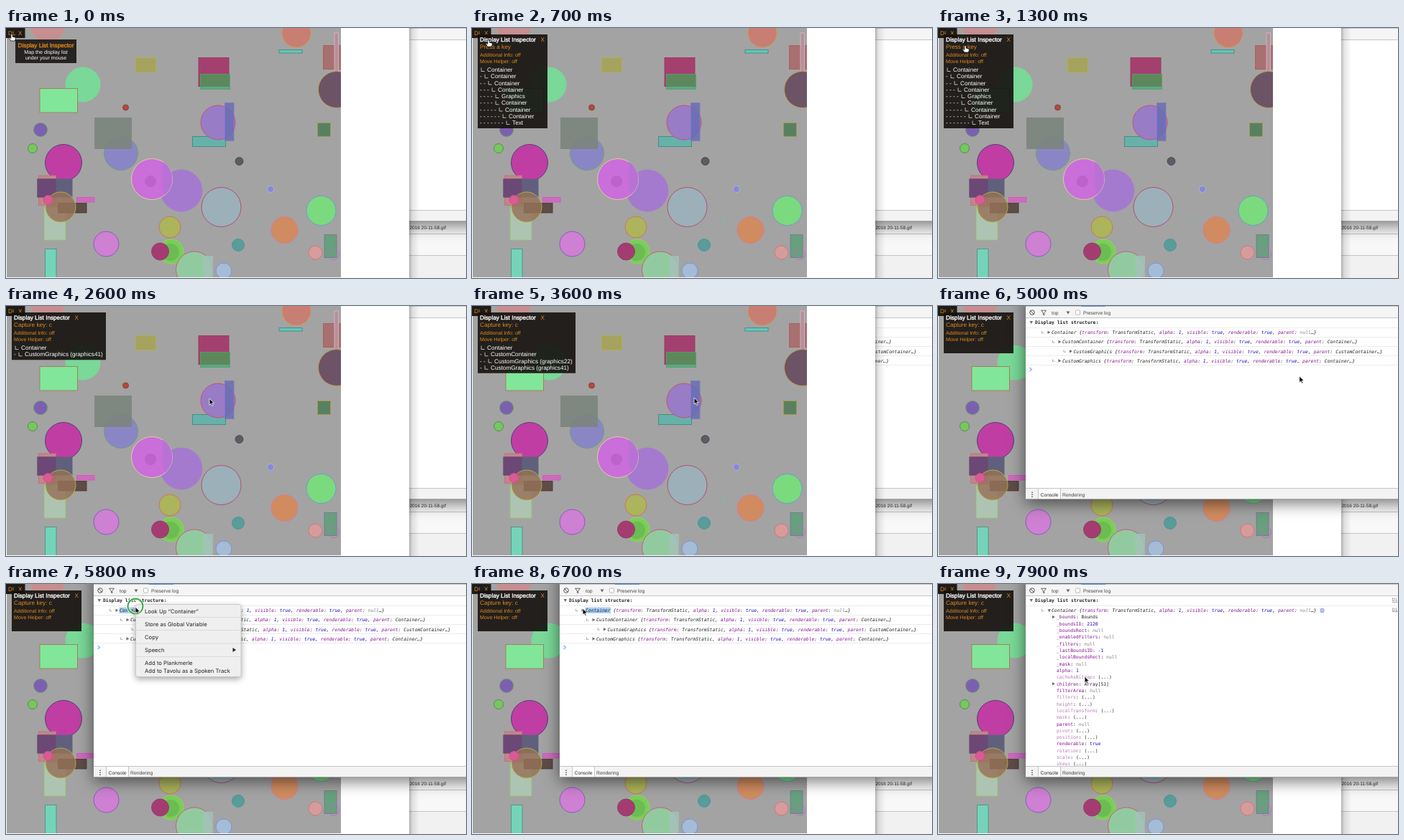
Write an HTML page that moves like this. It is 640 by 349 pixels and loops after 8 s.

```html
<!DOCTYPE html>
<html lang="en">
<head>
<meta charset="utf-8">
<title>Display List Inspector</title>
<style>
  html, body { margin: 0; width: 100%; height: 100%; overflow: hidden; background: #fff; }
  svg { display: block; width: 100%; height: 100%; }
  text { white-space: pre; text-rendering: geometricPrecision; }
  .ui { font: 8.2px "Liberation Sans", Arial, sans-serif; fill: #fff; }
  .ui .hot { fill: #e08a1c; }
  .ui .small { font-size: 7.1px; }
  .title { stroke: currentColor; stroke-width: .35; }
  .bar { font: 6.8px "Liberation Sans", Arial, sans-serif; fill: #444; }
  .menu { font: 7.7px Inter, sans-serif; fill: #222; }
  .log { font: 6.38px "DejaVu Sans Mono", monospace; fill: #222; }
  .key { fill: #881391; }
  .dim { fill: #b87cbd; }
  .val { fill: #1c00cf; }
  .nil { fill: #808080; }
  .line { stroke: #ececec; }
  .edge { stroke: #c4c4c4; }
</style>
</head>
<body>
<svg viewBox="0 0 640 349">
  <defs>
    <linearGradient id="fade">
      <stop stop-color="#000" stop-opacity=".28"/>
      <stop offset=".3" stop-color="#000" stop-opacity=".1"/>
      <stop offset="1" stop-color="#000" stop-opacity="0"/>
    </linearGradient>
    <clipPath id="page"><rect x="1" width="465" height="348"/></clipPath>
    <clipPath id="behind"><rect x="561" width="79" height="349"/></clipPath>
  </defs>

  <g id="browser">
    <rect width="561" height="349" fill="#fff"/>
    <rect x="1" width="465" height="348" fill="#a3a3a3"/>
    <g clip-path="url(#page)" stroke-opacity=".85">
      <circle cx="58" cy="-6" r="25" fill="#c68e90" stroke="#b9a37c"/>
      <circle cx="404" cy="7" r="20" fill="#c87e72" stroke="#d49a48"/>
      <rect x="380" y="30.500" width="32" height="4.500" fill="#66c6ba" stroke="#3c8a80"/>
      <rect x="441.500" y="24.500" width="26" height="33" fill="#a87070" stroke="#ae5a54"/>
      <rect x="457" y="7" width="5.500" height="55" fill="#b39298" stroke="#e4b2ca"/>
      <circle cx="460" cy="86" r="25.500" fill="#6c5366" stroke="#bca048"/>
      <rect x="433.500" y="132.500" width="18" height="19" fill="#588060" stroke="#aa9a40"/>
      <rect x="180.500" y="41.500" width="28" height="20" fill="#a6a260" stroke="#b0b444"/>
      <rect x="268" y="41.500" width="42" height="40" fill="#a44070" stroke="#9a3454"/>
      <rect x="270.500" y="64.500" width="41" height="21" fill="#5c885c" stroke="#52a468"/>
      <path d="M271 83.500h40" stroke="#5cae90" stroke-width="3"/>
      <circle cx="107" cy="79" r="24" fill="#7ad898" stroke="#70e490"/>
      <rect x="47" y="84.500" width="52.500" height="33.500" fill="#82e69a" stroke="#a07a50"/>
      <circle cx="166.500" cy="111" r="4" fill="#b44a3a" stroke="#80403a"/>
      <circle cx="48" cy="142" r="9.500" fill="#7c60b0" stroke="#649a68"/>
      <circle cx="37" cy="168" r="6.500" fill="#78c660" stroke="#468a42"/>
      <circle cx="160" cy="175" r="23.500" fill="#8a86c6" stroke="#68a06c"/>
      <rect x="123" y="125" width="52" height="44" fill="#7c847e" fill-opacity=".9"/>
      <rect x="259.500" y="151.500" width="46" height="14" fill="#66b2aa" stroke="#40867e"/>
      <circle cx="295" cy="132" r="24" fill="#997cc6" stroke="#ce4470"/>
      <rect x="304.500" y="104.500" width="12.500" height="53" fill="#666cb4" fill-opacity=".8" stroke="#8078c6"/>
      <circle cx="80" cy="188" r="25.500" fill="#c03ea4" stroke="#443868"/>
      <circle cx="244" cy="227" r="29" fill="#a47ace" stroke="#a67ad6"/>
      <circle cx="203" cy="211" r="28.500" fill="#ca6eda" stroke="#e6d8a0"/>
      <circle cx="201" cy="214" r="8" fill="#bc62ca"/>
      <path d="M218 186.500A28.500 28.500 0 0 1 222 232A29 29 0 0 1 218 213Z" fill="#b872d6"/>
      <circle cx="299.500" cy="250" r="27.500" fill="#9cb0ba" stroke="#b4405e"/>
      <circle cx="324.500" cy="186" r="5.500" fill="#605a64" stroke="#484448"/>
      <circle cx="368" cy="225" r="4.500" fill="#8888d6" stroke="#b8b2ea"/>
      <circle cx="438.500" cy="255" r="20.500" fill="#7cda7e" stroke="#609cd0"/>
      <circle cx="387.500" cy="282" r="18.500" fill="#d08c60" stroke="#e07494"/>
      <circle cx="323" cy="303" r="8.500" fill="#5a9c98" stroke="#3c94a2"/>
      <circle cx="350" cy="271" r="1.500" fill="#6cc4b4"/>
      <circle cx="430.500" cy="313.500" r="9.500" fill="#d69c9c" stroke="#d2706e"/>
      <rect x="443" y="288.500" width="17" height="32" fill="#66a07c" stroke="#7a7498"/>
      <circle cx="456" cy="316" r="7.500" fill="none" stroke="#c066ce"/>
      <circle cx="228" cy="278" r="15" fill="#acb45c" stroke="#ca7050"/>
      <circle cx="230" cy="312" r="17" fill="#7ace58" stroke="#96d85c"/>
      <circle cx="229" cy="313" r="12" fill="#6cbc54"/>
      <circle cx="214.500" cy="312" r="12" fill="#a43c72" stroke="#8a3c62"/>
      <circle cx="262" cy="337.500" r="25.500" fill="#92caa0" stroke="#c85070"/>
      <rect x="275" y="318" width="13" height="31" fill="#a4c2ba" fill-opacity=".85"/>
      <circle cx="303" cy="339" r="11" fill="#a4bcd6" stroke="#748cda"/>
      <circle cx="139.500" cy="301.500" r="17.500" fill="#ce80d2" stroke="#8450be"/>
      <rect x="54.500" y="308.500" width="15.500" height="42" fill="#74d4ba" stroke="#4c9078"/>
      <rect x="53" y="250" width="30" height="46" fill="#aec4b2" stroke="#94c268"/>
      <rect x="45.500" y="206" width="24" height="41.500" fill="#c0868c" stroke="#cc6a74"/>
      <rect x="43.500" y="210.500" width="49" height="26" fill="#60607c"/>
      <rect x="43.500" y="210.500" width="26" height="26" fill="#6c4876"/>
      <rect x="98.500" y="236.500" width="24.500" height="6.500" fill="#cc6cba" stroke="#d650ca"/>
      <rect x="72.500" y="244.500" width="39.500" height="13.500" fill="#5e4c46" stroke="#4c3632"/>
      <circle cx="76" cy="250" r="21" fill="#967258" fill-opacity=".82" stroke="#b2ba48"/>
      <circle cx="58.500" cy="240" r="6.500" fill="#d65c92" stroke="#e04494"/>
    </g>
    <g class="ui">
      <rect width="26.500" height="14" fill="#1e1b18"/>
      <text class="hot" x="3" y="10">DL</text>
      <text class="hot" x="17" y="10">X</text>
    </g>
    <g id="panels" class="ui"></g>
    <g class="ui" data-on="0 400" text-anchor="middle">
      <rect x="13" y="16" width="85" height="33" fill="#262322"/>
      <text class="hot title" color="#e08a1c" x="55.500" y="26.700">Display List Inspector</text>
      <text class="small" x="55.500" y="35.700">Map the display list</text>
      <text class="small" x="55.500" y="43.700">under your mouse</text>
    </g>
  </g>

  <g id="files">
    <rect x="561" width="79" height="349" fill="#f8f8f8"/>
    <path class="edge" d="M561 287.500h79M561 317.500h79"/>
    <rect x="561" y="318" width="79" height="31" fill="#f1f1f1"/>
  </g>

  <g id="console">
    <rect x="122" y="-20" width="540" height="290" style="filter:drop-shadow(0 5px 11px rgba(0,0,0,.55))"/>
    <rect x="122" width="518" height="270" fill="#fff"/>
    <rect x="122" width="518" height="16" fill="#f5f5f5"/>
    <path class="edge" d="M122 .5h518M122 16.500h518"/>
    <path d="M199 .5h34" stroke="#5b8ee6"/>
    <g fill="none" stroke="#555">
      <circle cx="131" cy="9" r="3.300"/>
      <path d="M128.700 6.700l4.600 4.600"/>
      <path d="M143.500 6.200h7l-2.700 3.300v3.500l-1.500-1v-2.500z" stroke-width=".9"/>
      <rect x="191.500" y="6" width="6" height="6" rx="1" fill="#fff" stroke="#aaa" stroke-width=".8"/>
    </g>
    <g class="bar">
      <text x="158" y="11.500">top</text>
      <path d="M178.500 7.500h5l-2.500 4z" fill="#666"/>
      <text x="202" y="11.500">Preserve log</text>
    </g>
    <g id="log" class="log"></g>
    <g class="bar">
      <rect x="122" y="254" width="518" height="16" fill="#f3f3f3"/>
      <rect x="140" y="254" width="30" height="16" fill="#fff"/>
      <path class="edge" d="M122 254.500h518M139.500 254v16M170.500 254v16"/>
      <path d="M122 269.500h518" stroke="#a8a8a8"/>
      <path d="M131 259.500v8" stroke="#555" stroke-width="1.500" stroke-dasharray="1.500 1.500"/>
      <text x="142.500" y="266" fill="#222">Console</text>
      <text x="173" y="266">Rendering</text>
    </g>
  </g>
  <text class="bar" x="561.500" y="281.300" style="font-size:6.5px;fill:#222">2016 20-11-58.gif</text>
  <rect id="shade" x="561" width="14" height="349" fill="url(#fade)"/>

  <g id="menu" class="menu" data-on="5700 6300">
    <rect x="180.500" y="28.500" width="146.500" height="101" rx="3" fill="#efefef" stroke="#bdbdbd" stroke-width=".7" style="filter:drop-shadow(0 3px 4px rgba(0,0,0,.35))"/>
    <path d="M181 46.500h146M181 64.500h146M181 83h146M181 101.500h146" stroke="#dadada"/>
    <path d="M315.500 89l4.500 3-4.500 3z"/>
  </g>

  <circle data-on="4500 4700" cx="582.600" cy="114.500" r="12.300" fill="none" stroke="#111" stroke-width="2"/>
  <g data-on="5700 5900" fill="none">
    <circle cx="180" cy="31" r="10.500" stroke="#fff" stroke-opacity=".7" stroke-width="4"/>
    <circle cx="180" cy="31" r="10.500" stroke="#3cae48" stroke-width="2"/>
  </g>
  <g id="cursor" stroke-width=".8" stroke-linejoin="round">
    <path data-on="0 1600" d="M-1.200 0Q0-1.200 1.200 0V3.200L4.800 4Q5.600 4.600 5.200 6.500L4.300 9H-1.200L-3.800 5.200Q-3.600 4-2.300 4.600L-1.200 5.500Z" fill="#fff" stroke="#111"/>
    <path data-on="1600 8000" d="M0 0V9.200L2.100 7.300 3.600 10.500 5.100 9.800 3.700 6.700H6.500Z" fill="#111" stroke="#fff"/>
  </g>
</svg>

<script>
const $ = id => document.getElementById(id);
const text = (x, y, body, attrs = '') => `<text x="${x}" y="${y}" ${attrs}>${body}</text>`;
const span = (cls, body) => `<tspan class="${cls}">${body}</tspan>`;

// Inspector overlay: rows are [depth, label]
function panel(on, key, rows = [], right = 105) {
  const height = 57 + 9.25 * Math.max(0, rows.length - 1);
  const tree = rows.map(([depth, label], i) => {
    const x = 11 + depth * 5.01, y = 61 + i * 9.25;
    return text(11, y, '- '.repeat(depth)) + text(x + 10, y, label) +
      `<path d="M${x + 2} ${y - 5.5}v5h4.500" fill="none" stroke="#ddd" stroke-width=".8"/>`;
  }).join('');
  return `<g data-on="${on}"><rect x="8" y="9" width="${right - 8}" height="${height}" fill="#14110f" fill-opacity=".9"/>` +
    text(11, 19, 'Display List Inspector', 'class="title" color="#fff"') +
    text(95.5, 19, 'X', 'class="hot"') + text(11, 28.7, key, 'class="hot"') +
    text(11, 40, 'Additional Info: off', 'class="hot small"') +
    text(11, 48.8, 'Move Helper: off', 'class="hot small"') + tree + '</g>';
}

const capture = 'Capture key: c', box = 'Container';
const uiRows = [0, 1, 2, 3, 4, 4, 5, 6, 7].map((d, i) => [d, i === 4 ? 'Graphics' : i === 8 ? 'Text' : box]);
$('panels').innerHTML =
  panel('400 1500', 'Press a key', uiRows) +
  panel('1500 1700', capture, uiRows) +
  panel('1700 2300 3700 8000', capture) +
  panel('2300 2900', capture, [[0, box], [1, 'CustomGraphics (graphics41)']], 139) +
  panel('2900 3700', capture, [[0, box], [1, 'CustomContainer'], [2, 'CustomGraphics (graphics22)'], [1, 'CustomGraphics (graphics41)']], 144);

// Console output
const arrow = (x, y, open) => `<path d="M${x} ${y}${open ? 'h4.600l-2.300 4z' : 'v4.600l3.800-2.300z'}" fill="#6e6e6e"/>`;
const elbow = (x, y) => `<path d="M${x} ${y - 3}v3h3" fill="none" stroke="#888" stroke-width=".7"/>`;
const pair = (key, val, cls) => span('key', key) + ': ' + span(cls, val);
const preview = (name, parent) => name + ' {' + [
  pair('transform', 'TransformStatic', ''), pair('alpha', '1', 'val'), pair('visible', 'true', 'val'),
  pair('renderable', 'true', 'val'), pair('parent', parent, parent === 'null' ? 'nil' : '')
].join(', ') + '…}';
const entry = (x, y, name, parent, open) =>
  elbow(x - 13.5, y - 1.5) + arrow(x - 5.5, y - (open ? 4 : 4.7), open) +
  text(x, y, preview(name, parent), 'font-style="italic"');

const fields = ('_bounds=Bounds _boundsID=2120 _boundsRect=null _enabledFilters=null _filters=null _lastBoundsID=-1 ' +
  '_localBoundsRect=null _mask=null alpha=1 cacheAsBitmap children=Array[51] filterArea=null filters height ' +
  'localTransform mask parent=null pivot position renderable=true rotation scale skew').split(' ');
const fieldRows = fields.map((field, i) => {
  const [key, val] = field.split('='), y = 48.4 + i * 9.32;
  const cls = val === 'null' ? 'nil' : /^(true|-?\d+)$/.test(val) ? 'val' : '';
  const body = val ? pair(key, val, cls) : span('dim', key) + ': (...)';
  return text(165, y, body) + (/^[A-Z]/.test(val || '') ? arrow(159, y - 4.7) : '');
}).join('');

const prompt = y => `<path d="M127.500 ${y - 2.5}l3 2.500-3 2.500" fill="none" stroke="#3f7fe8"/>`;
$('log').innerHTML =
  `<g data-on="0 3500">${prompt(23)}</g><g data-on="3500 8000">` +
  arrow(127.5, 21, true) + text(135, 25.4, 'Display list structure:', 'font-weight="bold"') +
  '<path class="line" d="M122 30.500h518"/></g>' +
  '<rect data-on="5600 7000" x="157.500" y="32.500" width="35.500" height="8.500" fill="#a9cdf6"/>' +
  '<g data-on="3500 7000"><path class="line" d="M122 43.500h518M122 56.500h518M122 69.500h518M122 82.500h518"/>' +
  entry(158, 39.2, box, 'null') + entry(173, 52.4, 'CustomContainer', box) +
  entry(188.5, 65.6, 'CustomGraphics', 'CustomContainer') + entry(173, 78.8, 'CustomGraphics', box) + prompt(88.5) + '</g>' +
  '<g data-on="7000 8000">' + entry(158, 39.2, box, 'null', true) +
  '<rect x="532" y="34.500" width="5" height="5" rx="1" fill="#b9c8f0" stroke="#7d95dc" stroke-width=".7"/>' + fieldRows +
  text(632, 24, 'Di', 'text-decoration="underline" fill="#777"') +
  text(632, 37.5, 'Di', 'text-decoration="underline" fill="#777"') + '</g>';

$('menu').innerHTML += [[41, 'Look Up “Container”'], [59, 'Store as Global Variable'], [77, 'Copy'], [95, 'Speech'],
  [113, 'Add to Plankmerle'], [124, 'Add to Tavolu as a Spoken Track']].map(([y, s]) => text(193, y, s)).join('');

// Pointer stops: time, x, y
const stops = [[0, 8, 9], [400, 8, 9], [1000, 38, 25], [1600, 38, 25], [2400, 283, 129], [2700, 283, 129],
  [3100, 309, 128], [3600, 309, 128], [4400, 582.5, 114], [4800, 582.5, 114], [5500, 180, 32], [6200, 180, 32],
  [6600, 154, 34], [7000, 154, 34], [7700, 204, 129], [8000, 204, 129]];
function pointer(t) {
  const i = stops.findIndex(s => s[0] > t), [t0, x0, y0] = stops[i - 1], [t1, x1, y1] = stops[i];
  const u = (t - t0) / (t1 - t0), e = u * u * (3 - 2 * u);
  return [x0 + (x1 - x0) * e, y0 + (y1 - y0) * e];
}

const timed = [...document.querySelectorAll('[data-on]')].map(el => [el, el.dataset.on.split(' ').map(Number)]);
function draw(now) {
  const t = Math.floor(now % 8000 / 100) * 100;
  for (const [el, times] of timed) {
    // An odd count of passed switch times means visible
    el.style.display = times.filter(s => s <= t).length % 2 ? '' : 'none';
  }
  // The click raises the console above the browser
  const front = t >= 4700;
  $('console').setAttribute('clip-path', front ? 'none' : 'url(#behind)');
  $('shade').setAttribute('y', front ? 270 : 0);
  $('cursor').setAttribute('transform', `translate(${pointer(t)})`);
}
const start = performance.now();
function tick() {
  draw(performance.now() - start);
  requestAnimationFrame(tick);
}
tick();
</script>
</body>
</html>
```
